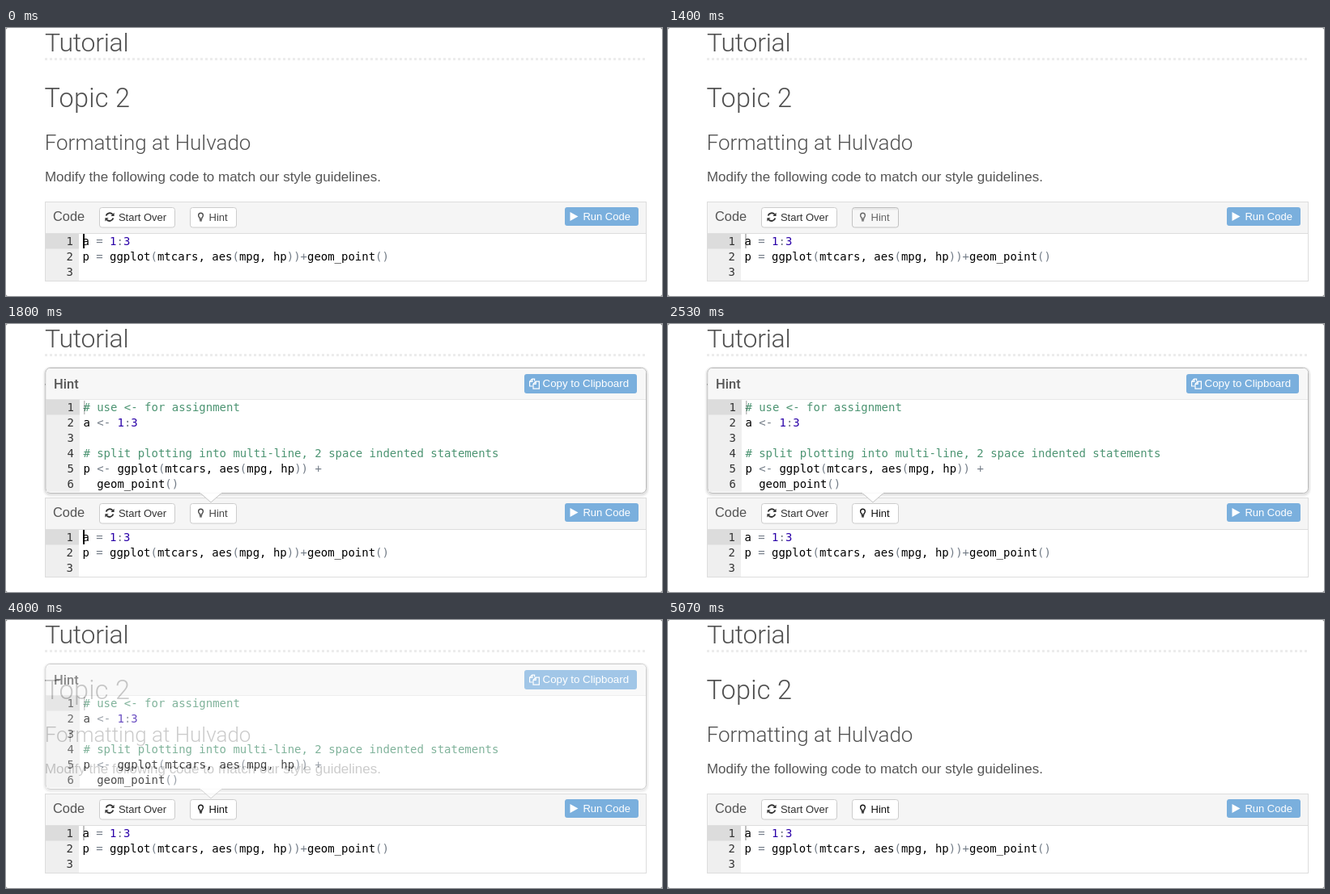
Write an HTML page that moves like this. It is 810 by 332 pixels and loops after 5.19 s.

```html
<!DOCTYPE html>
<html lang="en">
<head>
<meta charset="utf-8">
<title>Tutorial</title>
<style>
  html, body { margin: 0; width: 100%; height: 100%; overflow: hidden; background: #fff; }
  svg { display: block; width: 810px; height: 332px; }
  text { font-family: "Liberation Sans", Arial, sans-serif; white-space: pre; }
  .head { font-family: Roboto, sans-serif; font-weight: 300; fill: #505050; }
  .pop-title { font: 500 16.5px Roboto, sans-serif; fill: #555; }
  .label { font-size: 13px; }
  .mono, .mono text { font-family: "DejaVu Sans Mono", monospace; font-size: 13.98px; }
  .num { fill: #333; text-anchor: end; }
  .btn { fill: #fff; stroke: #ccc; }
  .blue { fill: #7aafdd; }
</style>
</head>
<body>
<svg viewBox="0 0 810 332" xmlns="http://www.w3.org/2000/svg">
  <rect width="810" height="332" fill="#777"/>
  <rect width="810" height="332" rx="2.5" fill="#fff"/>

  <text class="head" x="48" y="29" font-size="32" letter-spacing="-.25">Tutorial</text>
  <path d="M48 38.5H791" stroke="#ececec" stroke-width="3" stroke-dasharray="3 3"/>
  <text class="head" x="47.4" y="98" font-size="32.4" letter-spacing=".3">Topic 2</text>
  <text class="head" x="47.7" y="151" font-size="26">Formatting at Hulvado</text>
  <text x="47.9" y="190" font-size="16.98" fill="#555">Modify the following code to match our style guidelines.</text>

  <!-- exercise panel -->
  <rect x="48.5" y="215.5" width="742" height="98" fill="#fff" stroke="#ddd"/>
  <rect x="49" y="216" width="741" height="38" fill="#f5f5f5"/>
  <path d="M49 254.5H790" stroke="#ddd"/>
  <text x="58" y="239" font-size="16.4" fill="#555">Code</text>

  <rect class="btn" x="115.5" y="222.5" width="93" height="24.5" rx="3"/>
  <g fill="none" stroke="#333" stroke-width="1.9">
    <path d="M123.6 232.6A4.7 4.7 0 0 1 131.6 230.8M132.4 235.6A4.7 4.7 0 0 1 124.4 237.4"/>
    <path d="M133.6 228.8V233H129.4ZM122.4 239.4V235.2H126.6Z" fill="#333" stroke="none"/>
  </g>
  <text class="label" x="138.9" y="239" fill="#333">Start Over</text>

  <rect class="btn" id="hintBox" x="227.5" y="222.5" width="57" height="24.5" rx="3"/>
  <path id="inset" d="M228.5 223.5H283.5M228.5 224.5H283.5" stroke="#000" stroke-opacity=".06" stroke-width="2"/>
  <g id="hintLabel">
    <g transform="translate(240.5 234) scale(.84)" fill="none" stroke="currentColor" stroke-width="1.6">
      <path d="M-1.6 2.2C-1.6 .6 -3.4 0 -3.4 -2.2A3.4 3.4 0 0 1 3.4 -2.2C3.4 0 1.6 .6 1.6 2.2Z"/>
      <path d="M-1.9 4H1.9M-1.6 5.8H1.6"/>
    </g>
    <text class="label" x="250.5" y="239" fill="currentColor">Hint</text>
  </g>

  <rect class="blue" x="690" y="222" width="91" height="23" rx="3"/>
  <path d="M696.5 228V239L706.5 233.5Z" fill="#fff"/>
  <text class="label" x="712.4" y="238" fill="#fff">Run Code</text>

  <g id="editor" class="mono"></g>
  <rect id="caret" x="95" y="255" width="2" height="18"/>

  <!-- hint popover -->
  <g id="pop">
    <g fill="none" stroke="#000">
      <rect x="48" y="55" width="743.5" height="157" rx="7" stroke-opacity=".04" stroke-width="5"/>
      <rect x="48.5" y="55" width="742.5" height="156" rx="6.5" stroke-opacity=".07" stroke-width="3"/>
    </g>
    <rect x="49" y="54.5" width="741.5" height="155" rx="6" fill="#fff" stroke="#b9b9b9"/>
    <path d="M49.5 93V60.5Q49.5 55 55 55H784.5Q790 55 790 60.5V93Z" fill="#f7f7f7"/>
    <path d="M50 93.5H790" stroke="#e8e8e8"/>
    <path d="M240 209.5L253 221L266 209.5" fill="#fff" stroke="#c4c4c4"/>
    <path d="M240 208.8H266" stroke="#fff" stroke-width="2"/>
    <text class="pop-title" x="59" y="80">Hint</text>
    <rect class="blue" x="640" y="62" width="139" height="24" rx="3"/>
    <g fill="none" stroke="#fff" stroke-width="1.2">
      <path d="M650.5 77H646.6V71.2L649.6 68.2H652.6V70.5M649.8 68.2V71.4H646.6"/>
      <path d="M651 80.2V74.2L654 71.2H658.4V80.2ZM654.2 71.2V74.4H651"/>
    </g>
    <text x="662.6" y="78.3" font-size="13.3" fill="#fff">Copy to Clipboard</text>
    <g id="solution" class="mono"></g>
    <rect x="96" y="95" width="1.5" height="17" fill="#000" opacity=".25"/>
  </g>
</svg>
<script>
const LOOP = 5190, TICK = 200 / 3, FADE = 150;
const $ = id => document.getElementById(id);
const NS = "http://www.w3.org/2000/svg";

function add(parent, name, attrs, text) {
  const el = document.createElementNS(NS, name);
  for (const k in attrs) el.setAttribute(k, attrs[k]);
  if (text !== undefined) el.textContent = text;
  return parent.appendChild(el);
}

function tokenColor(s) {
  if (/^#/.test(s)) return "#4c9472";
  if (/^\d+$/.test(s)) return "#2a00a8";
  return /^[^\w\s,]+$/.test(s) ? "#747d88" : "#000";
}

function codeBlock(g, x, top, bottom, lines) {
  add(g, "rect", { x, y: top, width: 41, height: bottom - top, fill: "#efefef" });
  add(g, "rect", { x, y: top, width: 41, height: 19, fill: "#dcdcdc" });
  lines.forEach((line, i) => {
    const y = top + 14.2 + i * 19;
    add(g, "text", { class: "num", x: x + 34, y }, i + 1);
    const row = add(g, "text", { x: x + 45.4, y });
    const parts = line[0] === "#" ? [line] : line.split(/(\d+|[^\w\s,]+)/);
    for (const s of parts) if (s) add(row, "tspan", { fill: tokenColor(s) }, s);
  });
}

codeBlock($("editor"), 49, 254.5, 313, [
  "a = 1:3",
  "p = ggplot(mtcars, aes(mpg, hp))+geom_point()",
  ""
]);
codeBlock($("solution"), 50, 93.5, 208, [
  "# use <- for assignment",
  "a <- 1:3",
  "",
  "# split plotting into multi-line, 2 space indented statements",
  "p <- ggplot(mtcars, aes(mpg, hp)) +",
  "  geom_point()"
]);

const within = (t, a, b) => t >= a && t < b;
const ramp = (t, start) => Math.min(1, Math.max(0, (t - start) / FADE));

// solid while focused and blinking, faint once the editor loses focus
function caretOpacity(t) {
  if (t < 1260) return within(t, 260, 790) ? 0 : 1;
  if (within(t, 1590, 3860)) return (t - 1590) % 1000 < 500 ? 1 : 0;
  return 0.25;
}

function draw(ms) {
  const t = Math.floor((ms % LOOP + 5) / TICK) * TICK;
  const pressed = within(t, 1260, 1460) || within(t, 3860, 3955);
  $("hintBox").style.fill = pressed ? "#f7f7f7" : "#fff";
  $("hintBox").style.stroke = pressed ? "#c2c2c2" : "#ccc";
  $("inset").style.opacity = pressed ? 1 : 0;
  $("hintLabel").style.color = pressed ? "#666" : t < 2400 ? "#484848" : "#151515";
  $("caret").style.opacity = caretOpacity(t);
  const shown = ramp(t, 1480) - ramp(t, 3955);
  $("pop").style.opacity = shown;
  $("pop").style.visibility = shown > 0 ? "visible" : "hidden";
}

let start;
function frame(now) {
  if (start === undefined) start = now;
  draw(Math.max(0, now - start));
  requestAnimationFrame(frame);
}
draw(0);
requestAnimationFrame(frame);
</script>
</body>
</html>
```
